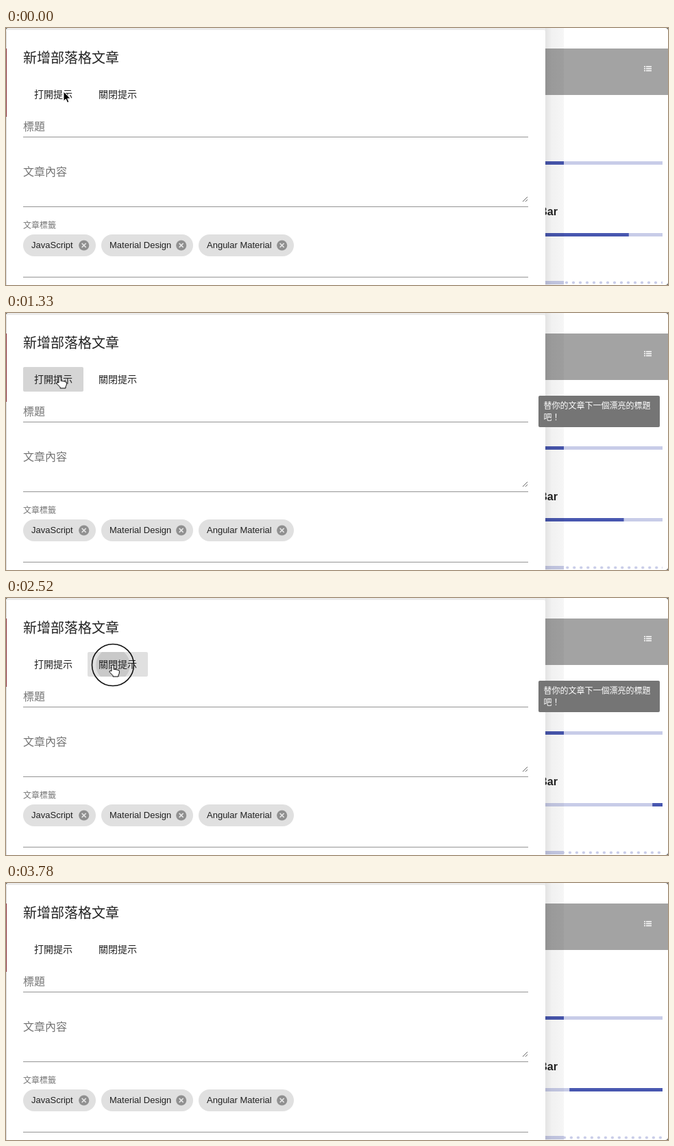
Animation, 966 px wide and 376 px high, one loop 3850 ms. Source, as an HTML page:

```html
<!DOCTYPE html>
<html lang="zh-Hant">
<head>
<meta charset="utf-8">
<style>
html, body { margin: 0; width: 100%; height: 100%; overflow: hidden; background: #555; }
svg { display: block; }
text { font-family: "Noto Sans CJK TC", "Noto Sans CJK", sans-serif; fill: #212121; white-space: pre; }
.medium { font-weight: 500; }
.hint { fill: #757575; }
.latin { font-family: "Liberation Sans", Arial, sans-serif; font-size: 13px; }
.dark { fill: #4857b0; }
.light { fill: #c8cce8; }
.fill {
  transform-box: fill-box; transform-origin: center;
  animation: 2s linear calc(var(--clock) * -1ms) infinite paused;
}
#primary { animation-name: primary-move, primary-size; }
#secondary { animation-name: secondary-move, secondary-size; }
@keyframes primary-move {
  0% { translate: 0; }
  20% { translate: 0; animation-timing-function: cubic-bezier(.5, 0, .702, .496); }
  59.15% { translate: 83.671%; animation-timing-function: cubic-bezier(.302, .381, .55, .956); }
  100% { translate: 200.611%; }
}
@keyframes primary-size {
  0% { scale: .08 1; }
  36.65% { scale: .08 1; animation-timing-function: cubic-bezier(.335, .125, .786, 1); }
  69.15% { scale: .661 1; animation-timing-function: cubic-bezier(.06, .11, .6, 1); }
  100% { scale: .08 1; }
}
@keyframes secondary-move {
  0% { translate: 0; animation-timing-function: cubic-bezier(.15, 0, .515, .41); }
  25% { translate: 37.652%; animation-timing-function: cubic-bezier(.31, .284, .8, .734); }
  48.35% { translate: 84.386%; animation-timing-function: cubic-bezier(.4, .627, .6, .902); }
  100% { translate: 160.278%; }
}
@keyframes secondary-size {
  0% { scale: .08 1; animation-timing-function: cubic-bezier(.15, 0, .515, .41); }
  19.15% { scale: .457 1; animation-timing-function: cubic-bezier(.31, .284, .8, .734); }
  44.15% { scale: .728 1; animation-timing-function: cubic-bezier(.4, .627, .6, .902); }
  100% { scale: .08 1; }
}
</style>
</head>
<body>
<svg id="stage" width="966" height="376" viewBox="0 0 966 376">
  <defs>
    <linearGradient id="shade">
      <stop offset="0" stop-opacity=".11"/>
      <stop offset=".35" stop-opacity=".055"/>
      <stop offset="1" stop-opacity=".035"/>
    </linearGradient>
    <pattern id="dots" x="0" y="370" width="10" height="5" patternUnits="userSpaceOnUse">
      <circle class="light" cx="5" cy="2.5" r="2.1"/>
    </pattern>
    <clipPath id="button0"><rect x="25" y="79" width="88" height="36" rx="2"/></clipPath>
    <clipPath id="button1"><rect x="119" y="79" width="88" height="36" rx="2"/></clipPath>
  </defs>

  <!-- page behind the dialog -->
  <rect width="966" height="376" rx="4" fill="#fff"/>
  <rect y="30" width="966" height="68" fill="#a3a3a3"/>
  <path d="M931 56.5h2m1 0h8M931 59.5h2m1 0h8M931 62.5h2m1 0h8" stroke="#fff" stroke-width="1.4"/>
  <text class="latin" x="805" y="274" text-anchor="end" style="font-size:16px;font-weight:bold">Bar</text>
  <rect class="light" x="558" y="195" width="400" height="5"/>
  <rect class="dark" x="558" y="195" width="256" height="5"/>
  <rect class="light" x="558" y="300" width="400" height="5"/>
  <rect class="dark fill" id="primary" x="-22.67" y="300" width="400" height="5"/>
  <rect class="dark fill" id="secondary" x="338.44" y="300" width="400" height="5"/>
  <rect x="814" y="370" width="144" height="5" fill="url(#dots)"/>
  <rect class="light" x="558" y="370" width="256" height="5"/>
  <rect x="958" y="300" width="8" height="6" fill="#fff"/>
  <rect x="787" width="27" height="376" fill="url(#shade)"/>

  <!-- dialog -->
  <path d="M4 0H787V10H0V4Q0 0 4 0Z" fill="#ececec"/>
  <rect y="5" width="1" height="371" fill="#d8d8d8"/>
  <rect y="30" width="1" height="100" fill="#8a2b36"/>
  <path d="M1 376V5q0-2 2-2H785q2 0 2 2V376Z" fill="#fff"/>
  <text class="medium" x="25" y="51" font-size="20">新增部落格文章</text>
  <g id="buttons"></g>
  <g class="medium" font-size="14">
    <text x="41" y="102">打開提示</text>
    <text x="135" y="102">關閉提示</text>
  </g>
  <text class="hint" x="25" y="150" font-size="16">標題</text>
  <text class="hint" x="25" y="216" font-size="16">文章內容</text>
  <text class="hint" x="25" y="293" font-size="12">文章標籤</text>
  <path d="M25 159.5H762M25 261.5H762M25 364.5H762" stroke="#949494"/>
  <path d="M754 254l7-7M758 254l3-3" stroke="#666"/>
  <g id="chips"></g>

  <g id="tooltip">
    <rect x="777" y="121" width="177" height="46" rx="2" fill="#757575"/>
    <g class="medium" font-size="12">
      <text x="784.5" y="140" style="fill:#fff">替你的文章下一個漂亮的標題</text>
      <text x="784.5" y="157" style="fill:#fff">吧！</text>
    </g>
  </g>
  <circle id="ring" r="30.5" fill="none" stroke="#111" stroke-width="1.6"/>
  <g id="cursor">
    <path id="arrow" d="M0 0V14l3.3-3 2.2 5.2 2.4-1-2.2-5H10Z" fill="#000" stroke="#fff"/>
    <path id="hand" d="M-2 9V1.5a1.6 1.6 0 0 1 3.2 0V6.5q2-1 3 .5 2-1 3 .7 2.3-.4 2.3 1.6 0 4-1.5 5.5V17H0v-1.5L-4.8 10.5q-.8-2 1-2Z" fill="#fff" stroke="#000"/>
  </g>
</svg>
<script>
const LOOP = 3850, STEP = 70;
const $ = id => document.getElementById(id);
const set = (el, attrs) => { for (const k in attrs) el.setAttribute(k, attrs[k]); };
const clamp = v => Math.min(1, Math.max(0, v));
const easeOut = v => 1 - (1 - clamp(v)) ** 3;

// Linear interpolation through [time, value] points
function track(t, points) {
  let i = 1;
  while (i < points.length - 1 && t > points[i][0]) i++;
  const [t0, a] = points[i - 1], [t1, b] = points[i];
  return a + (b - a) * clamp((t - t0) / (t1 - t0));
}

const chips = [["JavaScript", 25, 106], ["Material Design", 139, 134], ["Angular Material", 281, 139]];
$("chips").innerHTML = chips.map(([label, x, w]) => `
  <rect x="${x}" y="302" width="${w}" height="32" rx="16" fill="#e0e0e0"/>
  <text class="latin" x="${x + 12}" y="322">${label}</text>
  <g transform="translate(${x + w - 17.3} 318)">
    <circle r="7.6" fill="#909090"/>
    <path d="M-3-3 3 3M3-3-3 3" stroke="#e8e8e8" stroke-width="1.7"/>
  </g>`).join("");

const buttons = [
  { x: 25, enter: 70, leave: 1820, press: 630, at: [79, 93] },
  { x: 119, enter: 1820, leave: 3500, press: 2440, at: [156, 98] }
];
$("buttons").innerHTML = buttons.map((b, i) => `
  <g clip-path="url(#button${i})">
    <rect id="hover${i}" x="${b.x}" y="79" width="88" height="36" fill="#e0e0e0"/>
    <circle id="ripple${i}" cx="${b.at[0]}" cy="${b.at[1]}" fill-opacity=".1"/>
  </g>`).join("");

const pageClock = [[0, 1510], [1330, 2729], [2100, 3497], [2520, 3888], [3780, 5088]];
const cursorX = [[0, 84], [140, 79], [1680, 79], [2030, 156], [3430, 156], [3710, 106]];
const cursorY = [[0, 93], [140, 93], [1680, 93], [2030, 98], [3430, 98], [3710, 390]];

function draw(t) {
  const clock = track(t, pageClock);
  $("stage").style.setProperty("--clock", clock);
  set($("dots"), { x: 3 - (clock - 1510) / 25 % 10 });

  buttons.forEach((b, i) => {
    const age = t - b.press;
    set($("hover" + i), { opacity: clamp((t - b.enter) / 200) * (1 - clamp((t - b.leave) / 200)) });
    set($("ripple" + i), {
      r: age < 0 ? 0 : 58 * easeOut(age / 470),
      opacity: 1 - clamp((age - 500) / 400)
    });
  });

  const x = track(t, cursorX), y = track(t, cursorY);
  const hand = t > 0 && y < 115 && (x < 113 || x > 119);
  set($("cursor"), { transform: `translate(${x} ${y})` });
  set($("hand"), { opacity: +hand });
  set($("arrow"), { opacity: +!hand });

  const pressed = buttons.some(b => t >= b.press && t < b.press + 200);
  set($("ring"), { cx: x, cy: y, opacity: +pressed });

  const size = easeOut((t - 770) / 150) * (1 - clamp((t - 2590) / 150) ** 2);
  set($("tooltip"), { transform: `translate(777 144) scale(${size}) translate(-777 -144)` });
}

function tick(now) {
  draw(Math.floor(now % LOOP / STEP) * STEP);
  requestAnimationFrame(tick);
}
requestAnimationFrame(tick);
</script>
</body>
</html>
```
